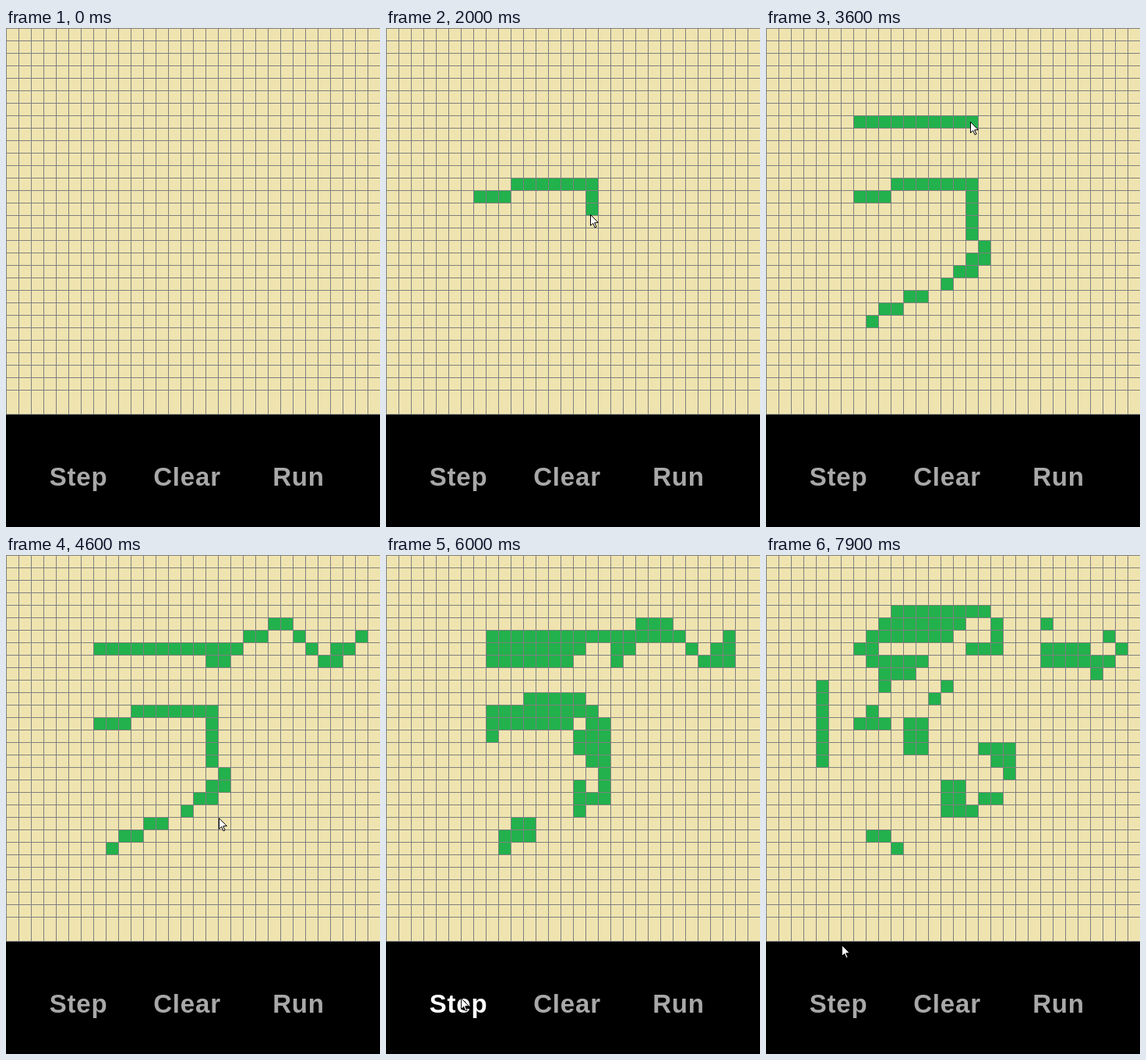
Animation of 480x640 px, one loop 8000 ms. Source, as an HTML page with a canvas:

```html
<!DOCTYPE html>
<html lang="en">
<head>
<meta charset="utf-8">
<title>Game of Life</title>
<style>
html, body { margin: 0; width: 100%; height: 100%; overflow: hidden; background: #000; }
canvas { display: block; width: 480px; height: 640px; }
</style>
</head>
<body>
<canvas id="stage" width="480" height="640"></canvas>
<script>
const ctx = document.getElementById('stage').getContext('2d');
const LOOP = 8000, TICK = 100;
const SIZE = 16, COUNT = 30, BOARD = 496;
const SAND = '#efe4b0', GREEN = '#22b14c', LINE = '#7f7f7f';
const FIRST_STEP = 5600, STEP_GAP = 450, STEPS = 3;

const linear = f => f;
const smooth = f => f * f * (3 - 2 * f);
const easeIn = p => f => f ** p;
const easeOut = p => f => 1 - (1 - f) ** p;

// Splits corner points into single cell steps
function trace(corners) {
  const cells = [corners[0]];
  for (let k = 1; k < corners.length; k++) {
    const [x, y] = corners[k - 1], [u, v] = corners[k];
    const n = Math.max(Math.abs(u - x), Math.abs(v - y));
    for (let i = 1; i <= n; i++) cells.push([x + (u - x) * i / n, y + (v - y) * i / n]);
  }
  return cells;
}

// The pointer travels or draws along corners given as [column, row]
const moves = [];
const draw = (start, end, ease, ...corners) =>
  moves.push({ start, end, ease, path: trace(corners), pen: true });
const travel = (start, end, ease, ...path) => moves.push({ start, end, ease, path });

travel(800, 1000, linear, [6.3, 13.4], [7, 13]);
draw(1000, 2340, easeIn(1.7), [7, 13], [9, 13], [10, 12], [16, 12], [16, 16], [17, 17],
  [17, 18], [16, 18], [16, 19], [15, 19], [14, 20]);
travel(2340, 2400, linear, [14, 20], [12, 21]);
draw(2400, 2600, linear, [12, 21], [8, 23]);
travel(2600, 3000, easeIn(2), [8, 23], [7, 7]);
draw(3000, 4300, easeIn(1.25), [7, 7], [16, 7], [16, 8], [17, 8], [17, 7], [18, 7], [19, 6],
  [20, 6], [21, 5], [22, 5], [25, 8], [26, 8], [26, 7], [27, 7], [28, 6]);
travel(4300, 5400, easeOut(2.2), [28, 6], [5.6, 35.1]);
travel(6600, 7400, smooth, [5.6, 35.1], [4, 10]);
draw(7400, 7650, linear, [4, 10], [4, 16]);
travel(7650, 7900, linear, [4, 16], [5.7, 30.9]);

const buttons = [['Step', 93], ['Clear', 232.5], ['Run', 375.5]];
const arrow = [[0, 0], [0, 14], [3.2, 11], [5.6, 16.4], [7.6, 15.5], [5.2, 10.3], [9.8, 10]];

const key = (col, row) => Math.floor(row) * COUNT + col;

// Position along a move, counted in path points
function progress({ start, end, ease, path }, time) {
  return ease(Math.min(1, (time - start) / (end - start))) * (path.length - 1);
}

function paint(cells, time, afterSteps) {
  for (const m of moves) {
    if (!m.pen || time < m.start || (m.start > FIRST_STEP) !== afterSteps) continue;
    const last = Math.floor(progress(m, time));
    for (const cell of m.path.slice(0, last + 1)) cells.add(key(...cell));
  }
  return cells;
}

function evolve(cells) {
  const next = new Set();
  for (let r = 1; r < COUNT - 1; r++) {
    for (let c = 1; c < COUNT - 1; c++) {
      let n = 0;
      for (let dr = -1; dr <= 1; dr++)
        for (let dc = -1; dc <= 1; dc++)
          if ((dr || dc) && cells.has(key(c + dc, r + dr))) n++;
      if (n === 3 || (n === 2 && cells.has(key(c, r)))) next.add(key(c, r));
    }
  }
  return next;
}

function cellsAt(time) {
  let cells = paint(new Set(), time, false);
  for (let i = 0; i < STEPS; i++)
    if (time >= FIRST_STEP + i * STEP_GAP) cells = evolve(cells);
  return paint(cells, time, true);
}

function pointerAt(time) {
  const m = moves.filter(move => move.start <= time).pop();
  if (!m) return null;
  const p = progress(m, time), i = Math.floor(p);
  const a = m.path[i], b = m.path[i + 1] || a;
  return a.map((v, k) => Math.round((v + (b[k] - v) * (p - i)) * SIZE + 6));
}

function drawGrid(cells) {
  ctx.fillStyle = LINE;
  ctx.fillRect(0, 0, 480, BOARD);
  for (let r = 0; r < COUNT; r++) {
    const y = r * SIZE + 1;
    const h = r === COUNT - 1 ? BOARD - 1 - y : SIZE - 1;
    for (let c = 0; c < COUNT; c++) {
      ctx.fillStyle = cells.has(key(c, r)) ? GREEN : SAND;
      ctx.fillRect(c * SIZE + 1, y, SIZE - 1, h);
    }
  }
}

function drawButtons(hover) {
  ctx.font = 'bold 33px "Liberation Sans", Arial, sans-serif';
  ctx.letterSpacing = '0.8px';
  ctx.textAlign = 'center';
  for (const [label, x] of buttons) {
    ctx.fillStyle = hover && label === 'Step' ? '#fff' : '#a8a8a8';
    ctx.fillText(label, x, 587);
  }
}

function drawPointer([x, y]) {
  ctx.beginPath();
  for (const [dx, dy] of arrow) ctx.lineTo(x + dx + 0.5, y + dy + 0.5);
  ctx.closePath();
  ctx.fillStyle = '#fff';
  ctx.fill();
  ctx.strokeStyle = '#000';
  ctx.lineWidth = 1;
  ctx.stroke();
}

function frame() {
  const time = Math.floor(performance.now() % LOOP / TICK) * TICK;
  const tip = pointerAt(time);
  const hover = tip && tip[0] > 50 && tip[0] < 135 && tip[1] > 555;
  ctx.fillStyle = '#000';
  ctx.fillRect(0, 0, 480, 640);
  drawGrid(cellsAt(time));
  drawButtons(hover);
  if (tip) drawPointer(tip);
  requestAnimationFrame(frame);
}
frame();
</script>
</body>
</html>
```
